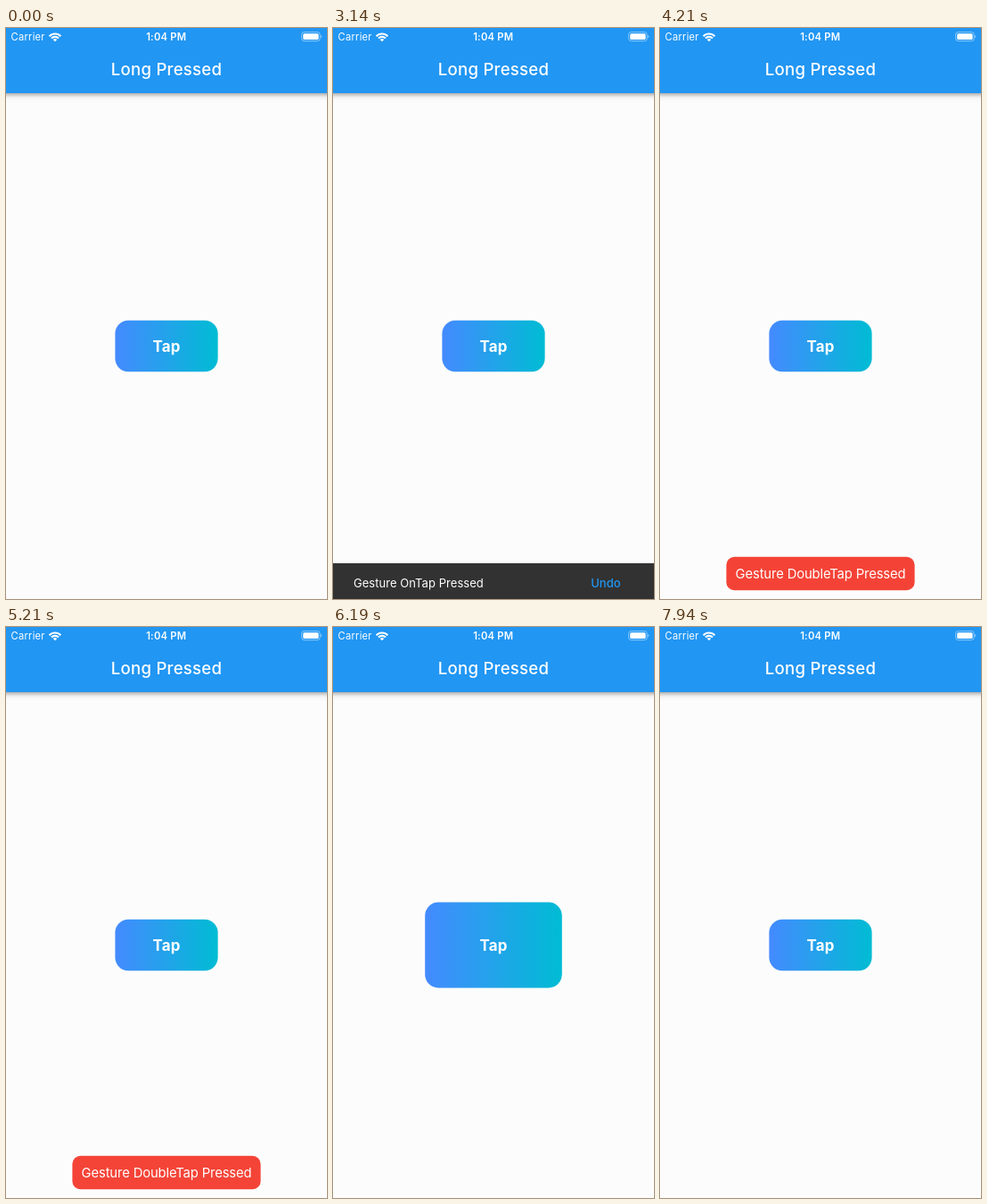
Animation of 360x640 px, one loop 7.98 s. Source, as an HTML page:

```html
<!DOCTYPE html>
<html lang="en">
<head>
<meta charset="utf-8">
<title>Long Pressed</title>
<style>
  html, body { margin: 0; height: 100%; overflow: hidden; background: #fcfcfc; }
  svg { display: block; width: 360px; height: 640px; font-family: Inter, Roboto, sans-serif; }
  text { fill: #fff; }
  .middle { text-anchor: middle; }
  .bar { fill: #2196f3; filter: drop-shadow(0 1px 2px #0004) drop-shadow(0 2px 3px #0003); }
  .arc { fill: none; stroke: #fff; stroke-width: 2.1; }
  .status { font-size: 11.2px; letter-spacing: .22px; }
  .title { font-size: 18.6px; font-weight: 500; letter-spacing: .25px; }
  .label { font-size: 16.9px; font-weight: 700; letter-spacing: .15px; }
  .note { font-size: 13px; letter-spacing: .05px; }
  .alert { font-size: 14.8px; letter-spacing: -.14px; }
</style>
</head>
<body>
<svg viewBox="0 0 360 640">
  <defs>
    <linearGradient id="blue">
      <stop stop-color="#448aff"/>
      <stop offset="1" stop-color="#00bcd4"/>
    </linearGradient>
  </defs>

  <rect class="bar" x="-10" y="-10" width="380" height="83"/>
  <text class="status" x="5.6" y="14">Carrier</text>
  <path class="arc" d="M48.6 9.2A8.8 8.8 0 0 1 61.4 9.2M51 11.6A5.6 5.6 0 0 1 59 11.6"/>
  <path fill="#fff" d="M52.8 13A3.2 3.2 0 0 1 57.2 13L55 15.2z"/>
  <text class="status middle" x="179.7" y="14" font-weight="600">1:04 PM</text>
  <rect x="331.6" y="4.6" width="20.6" height="10" rx="2.8" fill="none" stroke="#fff" stroke-opacity=".45"/>
  <rect x="333.2" y="6.2" width="17.4" height="6.8" rx="1.5" fill="#fff"/>
  <path fill="#fff" fill-opacity=".5" d="M353.2 8A1.7 1.7 0 0 1 353.2 11.2z"/>
  <text class="title middle" x="180" y="53">Long Pressed</text>

  <rect id="button" rx="15" fill="url(#blue)"/>
  <text class="label middle" x="180" y="363">Tap</text>

  <g id="snack">
    <rect width="360" height="47" fill="#323232"/>
    <text class="note" x="22.9" y="27">Gesture OnTap Pressed</text>
    <text class="note" x="289.2" y="27" style="fill:#2196f3;font-weight:500">Undo</text>
  </g>

  <g id="alert">
    <rect x="74.4" y="592.8" width="211.2" height="37.4" rx="9" fill="#f44336"/>
    <text class="alert middle" x="180" y="616.5">Gesture DoubleTap Pressed</text>
  </g>
</svg>
<script>
  const LOOP = 7980, SNACK_HEIGHT = 46;
  // The picture is held between these moments
  const ticks = [0, 2560, 2680, 2800, 3040, 3140, 3260, 3990, 4100, 4210,
    5210, 5320, 5420, 5970, 6080, 6190, 7720, 7830, 7940];
  const [button, snack, alertBox] = ['button', 'snack', 'alert'].map(id => document.getElementById(id));

  const clamp = v => Math.min(1, Math.max(0, v));
  const progress = (t, start, length) => clamp((t - start) / length);

  // cubic-bezier(.4, 0, .2, 1)
  function ease(x) {
    let lo = 0, hi = 1;
    for (let i = 0; i < 20; i++) {
      const u = (lo + hi) / 2, v = 1 - u;
      if (1.2 * v * v * u + .6 * v * u * u + u ** 3 < x) lo = u; else hi = u;
    }
    return lo * lo * (3 - 2 * lo);
  }

  const fade = p => ease(clamp((p - .45) / .55));

  function draw(t) {
    const grow = progress(t, 5935, 220) - progress(t, 7685, 220);
    const width = 115.2 + 38.4 * grow, height = 57.6 + 38.4 * grow;
    button.setAttribute('x', 180 - width / 2);
    button.setAttribute('y', 356.5 - height / 2);
    button.setAttribute('width', width);
    button.setAttribute('height', height);

    // The second tap replaces the snack bar and slides it in again
    const slide = t >= 3990 ? 0 : ease(progress(t, t < 3040 ? 2537 : 2991, 250));
    snack.setAttribute('transform', `translate(0 ${640 - SNACK_HEIGHT * slide})`);

    const shown = t < 5210 ? progress(t, 3965, 250) : 1 - progress(t, 5195, 250);
    alertBox.setAttribute('opacity', fade(shown));
  }

  const begin = performance.now();
  function frame() {
    const t = (performance.now() - begin) % LOOP;
    draw(ticks.findLast(tick => tick <= t));
    requestAnimationFrame(frame);
  }
  frame();
</script>
</body>
</html>
```
